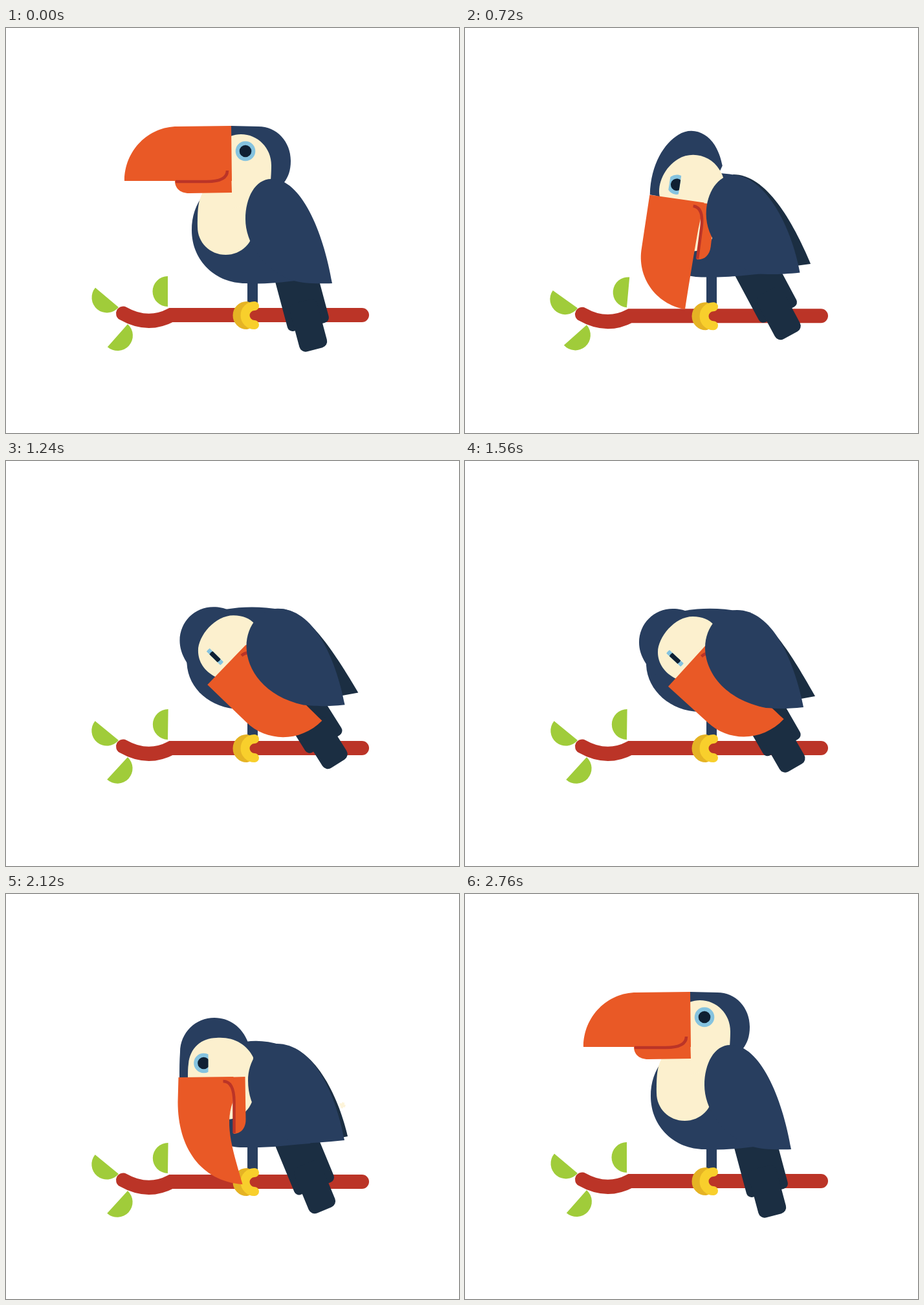
Animation of 700x625 px, one loop 3.04 s. Source, as an HTML page with a canvas:

```html
<!DOCTYPE html>
<html lang="en">
<head>
<meta charset="utf-8">
<title>Toucan</title>
<style>
  html, body { margin: 0; overflow: hidden; background: #fff; }
  canvas { display: block; }
</style>
</head>
<body>
<canvas id="stage" width="700" height="625"></canvas>
<script>
const ctx = document.getElementById('stage').getContext('2d');
const LOOP = 3040, STEP = 40;
const NAVY = '#283e5f', DARK = '#1b2e42', CREAM = '#fcf0ce', ORANGE = '#e95926',
      RED = '#bb3427', GREEN = '#a0cc3a', YELLOW = '#f8cf2c', OCHRE = '#e5b324';

// Poses: 0 upright, 1 nodding, 2 asleep, 3 breathing out, 4 waking, 5 wings spread
const bodyKeys = [[0, 0], [560, 1], [960, 2], [1560, 3], [1760, 3], [2080, 4], [2120, 4], [2280, 0], [LOOP, 0]];
const wingKeys = [[0, 0], [560, 1], [960, 2], [1560, 3], [1760, 3], [2080, 4], [2200, 4], [2400, 5], [2460, 5], [2680, 0], [LOOP, 0]];

// Per pose: beak corner x, y, angle, upper lid, lower lid
const heads = [[348, 151, 0, 16, 16], [272.5, 211, -52.5, 16, 5.5], [309, 343, -134, 3.5, 3.5],
               [314, 348, -137, 3.5, 3.5], [266.5, 283, -90, 16, 7]];
const tails = [[416, 391.5, 15], [417.5, 388, 25], [423, 383, 34], [424, 388, 30], [417.5, 392, 22.5]];
const sways = [[0, 0], [2, 1], [0, .12], [0, .1], [1, .1]];  // branch drop, leaf turn
const openings = [[0], [-2], [0], [0], [0], [-8]];
const leaves = [[250, 430, -90, 7.5], [174, 431, -140, -6.5], [188, 457, 131.5, 10]];
const sparks = [[520, 326, 2040, .8], [518, 291, 2350, 1], [551, 331, 2330, .8], [561, 291, 2330, .9]];

const body = [
  'M360 230C312 235 287 270 287 312C287 360 325 394 370 394C415 396 440 390 480 386C468 330 452 260 432 240Q396 230 360 230Z',
  'M360 222C312 230 286 262 286 304C286 355 322 387 368 387C410 388 430 384 470 382C480 330 460 240 420 228Q390 222 360 222Z',
  'M340 227C300 250 279 270 279 310C281 350 315 378 360 380C420 380 440 376 460 372C480 330 460 240 425 227Q380 220 340 227Z',
  'M340 231C300 255 280 275 280 315C282 355 318 386 362 387C410 388 440 384 465 380C480 330 460 240 425 232Q380 224 340 231Z',
  'M340 235C305 255 284 280 284 316C284 360 322 391 366 391C410 392 430 388 470 385C480 330 460 240 425 233Q396 224 370 228Z'
];
const belly = [
  'M310 245C296 262 296 280 296 307C296 331 315 350 339.5 350C364 350 383 331 383 307C383 285 381 270 380 250Z',
  'M306 240C297 256 297 275 297 301C297 325 316 344 340 344C364 344 383 325 383 301C383 280 381 264 380 244Z',
  'M340 320C339 322 339 324 340 326C345 340 360 345 375 345C385 345 390 335 390 320C390 300 388 295 385 290Z',
  'M344 324C343 326 343 328 344 330C349 344 362 349 377 349C387 349 390 339 390 324C390 304 388 299 385 294Z',
  'M302 250C296 265 296 280 296 305C296 329 315 348 340 348C364 348 383 329 383 305C383 284 381 268 380 250Z'
];
const nearWing = [
  'M410 233C455 232 490 312 504 394C475 395 460 394 440 389C395 370 370 330 370 295C370 262 385 233 410 233Z',
  'M412 227C457 231 500 305 514 380C485 383 465 384 445 382C400 362 373 325 373 288C373 255 390 227 412 227Z',
  'M420 226C476 226 510 300 524 373C485 377 465 374 455 373C400 360 372 320 372 285C372 250 395 226 420 226Z',
  'M420 230C474 230 508 305 523 380C495 383 480 382 465 381C400 368 371 325 371 288C371 255 395 230 420 230Z',
  'M418 231C474 231 509 305 523 380C495 383 470 384 450 386C400 366 374 330 374 288C374 258 392 231 418 231Z',
  'M410 229C460 229 520 290 545 352C520 362 500 370 478 369C430 365 381 325 381 270C381 245 390 229 410 229Z'
];
const farWing = [
  'M410 236C448 236 485 312 502 392L480 392L420 330Z',
  'M412 226C467 228 507 305 527 370L513 371L420 330Z',
  'M418 226C462 222 505 285 547 353L520 358L420 330Z',
  'M418 231C462 226 505 300 541 363L519 367L420 330Z',
  'M418 232C475 231 513 310 528 374L518 376L420 330Z',
  'M437 221C490 232 535 265 569 298L530 328L437 300Z'
];

// Restates stage coordinates relative to the turned beak corner of a pose
function toHead(path, pose) {
  const [cx, cy, degrees] = heads[pose], angle = degrees * Math.PI / 180;
  const cos = Math.cos(angle), sin = Math.sin(angle);
  return path.replace(/([\d.]+) ([\d.]+)/g, (_, x, y) => {
    const dx = x - cx, dy = y - cy;
    return (dx * cos + dy * sin).toFixed(2) + ' ' + (dy * cos - dx * sin).toFixed(2);
  });
}
const hood = [
  'M347 151C362 151 375 152 390 152C418 152 440 175 440 205C440 220 436 230 430 238L345 238Z',
  'M273 210C300 165 340 146 368 146C390 146 400 165 400 185C400 205 396 215 393 225L340 260Z',
  'M311 343C280 320 268 295 268 275C268 246 291 223 320 223C330 223 336 225 342 227L380 285Z',
  'M316 346C281 324 269 300 269 280C269 251 292 228 321 228C331 228 337 230 343 232L380 288Z',
  'M268 283C268 270 268 258 269 244C269 214 293 191 322 191C345 191 365 205 374 229L370 285Z'
].map(toHead);
const face = [
  'M347 167C352 165 358 164 363 164C389 164 410 185 410 212C410 225 409 235 408 250L381 268L347 280Z',
  'M284 220C290 200 318 180 346 180C372 180 388 200 387 225C387 235 384 242 382 260L375 320L340 300Z',
  'M322 331C305 322 296 308 296 291C296 268 322 237 351 237C366 237 376 242 384 250L385 290L360 300Z',
  'M326 336C308 327 298 312 298 295C298 272 324 240 352 240C367 240 377 245 385 253L385 290L362 303Z',
  'M281 284C281 275 281 268 282 262C284 238 302 222 325 222C352 220 372 232 382 252L380 320L340 300Z'
].map(toHead);

// Beak paths are relative to its upper corner
const beakRest = 'M0 0L-83 1C-128 1 -165 38 -165 85C-120 85 -60 85 -40 85L1 85Z';
const upperBeak = [
  beakRest,
  'M0 0L-83 0C-128 -1 -165 32 -167 79C-120 79 -60 80 -40 81L1 85Z',
  beakRest, beakRest,
  'M0 0L-38 -1C-108 -1 -160 34 -165 99C-118 86 -75 70 -38 84L1 85Z'
];
const lowerBeak = 'M0 70L1 103L-65 104C-80 104 -87 95 -87 85L-20 85Z';
const mouth = 'M-86 86H-38C-13 86 -6 78 -6 69';

const lerp = (a, b, u) => a + (b - a) * u;
const mixNumbers = (a, b, u) => a.map((v, i) => lerp(v, b[i], u));
function mixPaths(a, b, u) {
  const number = /-?[\d.]+/g, target = b.match(number);
  let i = 0;
  return a.replace(number, v => lerp(+v, +target[i++], u));
}

function poseAt(keys, t) {
  const i = keys.findIndex(k => k[0] > t);
  const [t0, from] = keys[i - 1], [t1, to] = keys[i];
  const u = (t - t0) / (t1 - t0), eased = u * u * (3 - 2 * u);
  return list => (typeof list[0] === 'string' ? mixPaths : mixNumbers)(list[from], list[to], eased);
}

function fill(path, color) {
  ctx.fillStyle = color;
  ctx.fill(new Path2D(path));
}
function stroke(path, color, width, cap = 'round') {
  ctx.strokeStyle = color;
  ctx.lineWidth = width;
  ctx.lineCap = cap;
  ctx.stroke(new Path2D(path));
}
function disc(x, y, r, color) {
  ctx.fillStyle = color;
  ctx.beginPath();
  ctx.arc(x, y, r, 0, 7);
  ctx.fill();
}
function placed(x, y, degrees, draw) {
  ctx.save();
  ctx.translate(x, y);
  ctx.rotate(degrees * Math.PI / 180);
  draw();
  ctx.restore();
}
function roundBox(x, y, w, h, r) {
  ctx.beginPath();
  ctx.roundRect(x, y, w, h, r);
  ctx.fill();
}

function drawPerch([drop, turn]) {
  placed(0, drop, 0, () => {
    for (const [x, y, angle, swing] of leaves)
      placed(x, y, angle + swing * turn, () => fill('M0 0H47A23.5 23.5 0 0 0 0 0Z', GREEN));
    stroke('M550 443H255Q219 462 181 440.5', RED, 22);
    stroke('M381 370V428', NAVY, 16, 'butt');
    const claw = 'M384 429A14.5 14.5 0 0 0 384 458';
    placed(-12, 0, 0, () => stroke(claw, OCHRE, 14));
    stroke(claw, YELLOW, 14);
  });
}

function drawTail([x, y, angle]) {
  placed(x, y, -angle, () => {
    ctx.fillStyle = DARK;
    roundBox(0, -20, 66, 101, 8);
    roundBox(10, 40, 44, 77, 10);
  });
}

function drawEye(upper, lower) {
  ctx.save();
  ctx.beginPath();
  ctx.rect(0, 39 - upper, 50, upper + lower);
  ctx.clip();
  disc(22, 39, 15.3, '#85c3df');
  disc(22, 39, 9.3, '#0f2033');
  ctx.restore();
}

function drawBeak(upper, opening) {
  const onJaw = draw => placed(1, 100, opening, () => {
    ctx.translate(-1, -100);
    draw();
  });
  onJaw(() => fill(lowerBeak, ORANGE));
  fill(upper, ORANGE);
  onJaw(() => stroke(mouth, RED, 4.5, 'butt'));
}

function drawSparks(t) {
  for (const [x, y, start, strength] of sparks) {
    const age = (t - start) / 200;
    if (age <= 0 || age >= 1) continue;
    ctx.globalAlpha = strength * Math.sin(age * Math.PI);
    placed(x, y, 20, () => stroke('M-4.5 0H4.5M0 -4.5V4.5', CREAM, 4, 'butt'));
  }
  ctx.globalAlpha = 1;
}

function draw(t) {
  const pose = poseAt(bodyKeys, t), wingPose = poseAt(wingKeys, t);
  const [x, y, angle, upperLid, lowerLid] = pose(heads);
  ctx.clearRect(0, 0, 700, 625);
  drawPerch(pose(sways));
  drawTail(pose(tails));
  fill(wingPose(farWing), DARK);
  fill(pose(body), NAVY);
  fill(pose(belly), CREAM);
  placed(x, y, angle, () => {
    fill(pose(hood), NAVY);
    fill(pose(face), CREAM);
    drawEye(upperLid, lowerLid);
    drawBeak(pose(upperBeak), wingPose(openings)[0]);
  });
  fill(wingPose(nearWing), NAVY);
  drawSparks(t);
}

function tick() {
  draw(Math.floor(performance.now() % LOOP / STEP) * STEP);
  requestAnimationFrame(tick);
}
tick();
</script>
</body>
</html>
```
